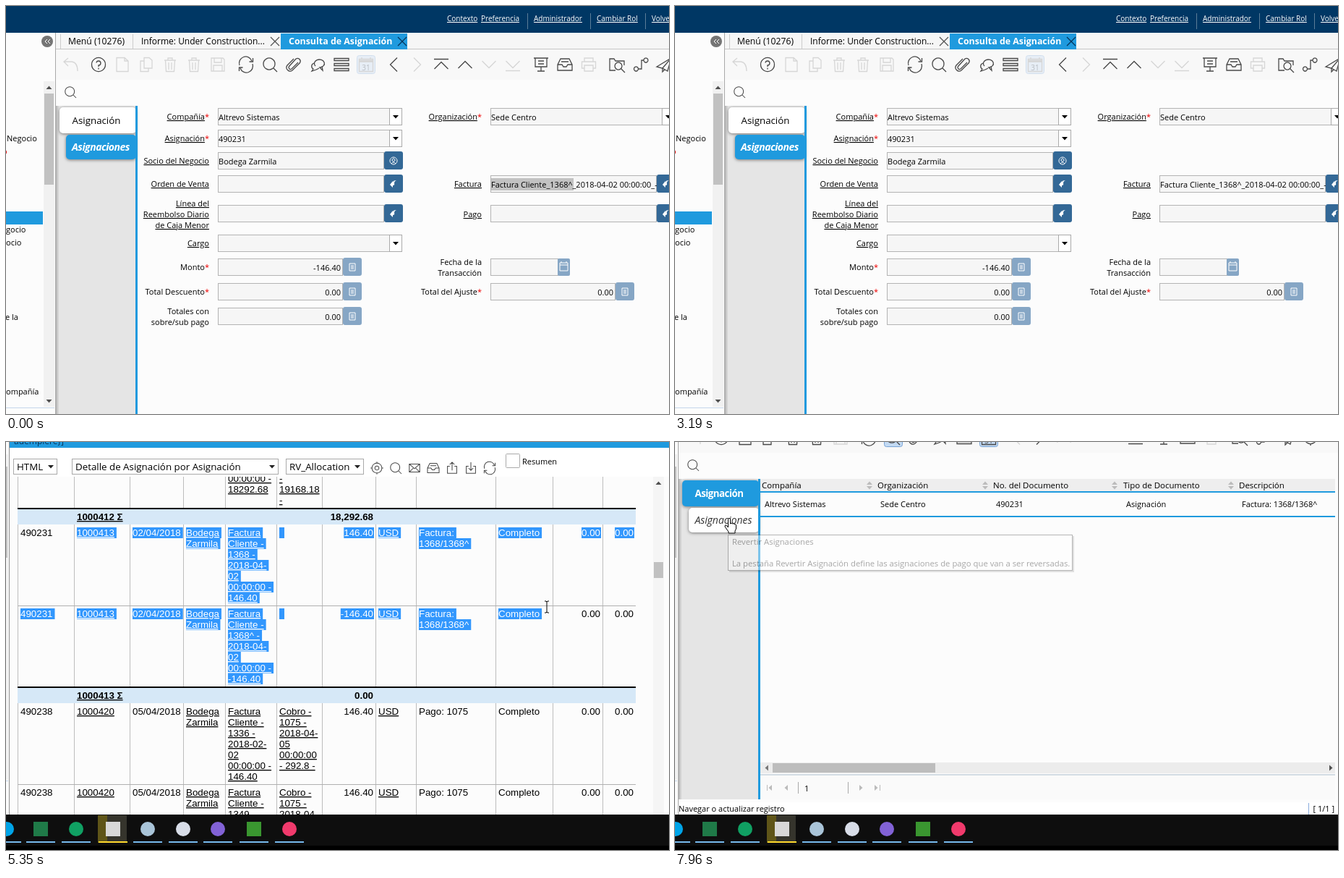
Animation of 917x564 px, one loop 7990 ms. Source, as an HTML page:

```html
<!DOCTYPE html>
<html lang="es">
<head>
<meta charset="utf-8">
<style>
html, body { margin: 0; width: 100%; height: 100%; overflow: hidden; background: #fff }
svg { display: block; font: 11px "Open Sans", sans-serif }
.icon { fill: none; stroke: #484848; stroke-width: 1.3 }
.off, .form .noform, .grid .nogrid, .rec2 .nolast { stroke: #d6d6d6 }
.grid .formOnly, .form .gridOnly, .rec1 .r2, .rec2 .r1 { display: none }
.form .toggle { opacity: .3 }
.tab rect { fill: #fff; filter: drop-shadow(0 1px 2px #777) }
.tab text { font-size: 13.3px; text-anchor: middle }
.tab.two text { font-size: 14px; font-style: italic; fill: #333 }
.grid .one rect, .form .two rect { fill: #1f9ade }
.grid .tab.one text, .form .tab.two text { fill: #fff; font-weight: bold; letter-spacing: -.5px }
#table { font: 13.33px "Liberation Sans", Arial, sans-serif }
.mark { fill: none }
.sel .mark { fill: #3297fd }
.sel text { fill: #fff }
.hover text { fill: #f00 }
.old .mark { fill: #c4c4c4 }
</style>
</head>
<body>
<svg id="stage" width="917" height="564" viewBox="0 0 917 564"></svg>
<script>
const LOOP = 7990, BLUE = '#1f9ade';
const COMPANY = 'Altrevo Sistemas', ORG = 'Sede Centro', PARTNER = 'Bodega|Zarmila';

const rect = (x, y, w, h, fill, more = '') =>
  `<rect x="${x}" y="${y}" width="${w}" height="${h}" fill="${fill}" ${more}/>`;
const text = (x, y, s, more = '') => `<text x="${x}" y="${y}" ${more}>${s}</text>`;
const path = (d, more = '') => `<path d="${d}" ${more}/>`;
const at = (x, y, body) => `<g transform="translate(${x} ${y})">${body}</g>`;
const disc = (x, y, r, fill) => `<circle cx="${x}" cy="${y}" r="${r}" fill="${fill}"/>`;
const triangle = (x, y, turn, fill = '#505050') =>
  path('M-4-2H4L0 2.5Z', `transform="translate(${x} ${y}) rotate(${turn})" fill="${fill}"`);
const end = 'text-anchor="end"', under = 'text-decoration="underline"';

const ring = (x, y, r) => `M${x + r} ${y}A${r} ${r} 0 1 1 ${x + r} ${y - .01}`;
const ICONS = {
  undo: 'M-4-9L-10-4L-4 2M-10-4H1Q9-3 9 9',
  help: ring(0, 0, 9.5) + 'M-3-2.5A3 3 0 1 1 0 1V3M0 4.5V6.5',
  add: 'M-8-9.5H3L8-5V9.5H-8ZM3-9.5V-5H8',
  copy: 'M-3-9.5H4L8-6V5H-3ZM-3-5H-8V9.5H3V5',
  trash: 'M-8-6H8M-3-6V-9H3V-6M-6.5-6L-5.5 9.5H5.5L6.5-6M-2-3V7M2-3V7',
  save: 'M-9-9H7L9-7V9H-9ZM-5-9V-3H5V-9M-6 9V1H6V9',
  refresh: 'M-9 1A9 9 0 0 1 8-5M9.5-9V-4H4.5M9-1A9 9 0 0 1-8 5M-9.5 9V4H-4.5',
  search: ring(-1, -1, 8) + 'M5 5L10 10',
  clip: 'M6-3L-3 6A2.5 2.5 0 0 1-6.5 2.5L3-8A4 4 0 0 1 8.5-2.5L-2 8A5 5 0 0 1-9 1L0-8',
  chat: 'M-3 2A7 5.5 0 1 1 3 4L7 8L6 2M-5-2A5 4.5 0 0 0-6 6L-8 9L-2 7L2 5',
  list: 'M-10-8.500H10V-5.500H-10ZM-10-1.500H10V1.500H-10ZM-10 5.500H10V8.500H-10Z',
  calendar: 'M-9.500-7.500H9.500V9.500H-9.500ZM-9.500-4H9.500M-9.500-5.500H9.500M-6-10V-7M6-10V-7',
  left: 'M5-9.500L-4.500 0L5 9.500', right: 'M-5-9.500L4.500 0L-5 9.500',
  first: 'M-10-7.500H10M-9.500 6L0-3.500L9.500 6', up: 'M-9.500 5L0-4.500L9.500 5',
  down: 'M-9.500-5L0 4.500L9.500-5', last: 'M-9.500-5L0 4.500L9.500-5M-10 8.500H10',
  board: 'M-10-9H10M-8-9V3H8V-9M0 3V9M-5 9H5M-4-5H4M-4-1H4',
  inbox: 'M-10 0L-6-8H6L10 0V8H-10ZM-10 0H-4L-2 3H2L4 0H10M-5-4H5',
  print: 'M-6-4V-9H6V-4M-6 5H-9.500V-4H9.500V5H6M-6 1H6V9H-6Z',
  folder: 'M-2 8H-10V-8H-4L-2-5H10V1' + ring(2, 2, 5) + 'M6 6L11 11',
  flow: ring(-6.5, 6, 3) + ring(7, -6, 3) + 'M-3.500 6H1V-6H4',
  send: 'M-10 3L10-9L5 9L-2 5ZM-2 5L10-9M-2 5V10L1 7',
  gear: ring(0, 0, 8.5) + ring(0, 0, 3.5) + 'M0-8V-11M0 8V11M-8 0H-11M8 0H11',
  mail: 'M-9-7H9V7H-9ZM-9-7L0 1L9-7M-9 7L-2 0M9 7L2 0',
  upload: 'M-4-3H-8V9H8V-3H4M0 4V-10M-4-6L0-10L4-6',
  download: 'M-4-3H-8V9H8V-3H4M0-10V4M-4 0L0 4L4 0'
};
const icon = (name, x, y, cls = '', scale = 1) =>
  path(ICONS[name], `class="icon ${cls}" transform="translate(${x} ${y}) scale(${scale})"`);

// ---- application window ----
const toolbar = [
  ['undo', 90, 'off'], ['help', 128], ['add', 161, 'noform'], ['copy', 194, 'noform'],
  ['trash', 227, 'noform'], ['trash', 260, 'noform'], ['save', 293, 'off'], ['refresh', 332],
  ['search', 365], ['clip', 398], ['chat', 431], ['list', 464], ['calendar', 498, 'noform'],
  ['left', 536, 'nogrid'], ['right', 569, 'noform'], ['first', 602], ['up', 635],
  ['down', 668, 'nolast'], ['last', 701, 'nolast'], ['board', 740], ['inbox', 773],
  ['print', 806, 'off'], ['folder', 845], ['flow', 878], ['send', 910], ['gear', 943]
];
const pressed = (x, cls) => rect(x - 12.5, 68.5, 25, 25, '#c3daf3', `rx="3" stroke="#79a4d6" class="${cls}"`);
const cross = (x, color) => path(`M${x - 6} 43l12 12m0-12l-12 12`, `stroke="${color}" stroke-width="1.3"`);

function chrome() {
  const links = [[610, 'Contexto'], [657, 'Preferencia'], [730, 'Administrador'], [817, 'Cambiar Rol'], [893, 'Volver']];
  const tree = [[1, 187, 'Negocio'], [-5, 205, 'o', 'fill="#d00"'], [0, 313, 'gocio'], [0, 331, 'ocio'],
    [-1, 434, 'e la'], [0, 537, 'ompañía']];
  return rect(0, 0, 990, 640, '#fcfcfc') + rect(0, 0, 990, 37, '#003764')
    + links.map(([x, s]) => text(x, 21, s, `fill="#fff" font-size="10" ${under}`)).join('')
    + [721, 808, 884].map(x => rect(x, 10, 1, 22, '#5c7d98')).join('')
    + disc(57, 49, 8, '#757575') + path('M57 46l-3 3l3 3m4-6l-3 3l3 3', 'fill="none" stroke="#fff"')
    + rect(0, 284, 51, 18, BLUE) + tree.map(a => text(...a)).join('')
    + rect(52, 104, 15, 450, '#f1f1f1') + rect(53, 121, 13, 126, '#c1c1c1')
    + triangle(59.5, 113, 180) + triangle(59.5, 546, 0) + rect(0, 555, 67, 1, '#c4d6ea')
    + rect(69, 37, 921, 22, '#f6f6f6') + rect(69, 59, 921, 1, '#c6c6c6')
    + rect(75, 39, 1, 20, '#ccc') + rect(175, 39, 1, 20, '#ccc') + rect(380, 38, 175, 22, BLUE)
    + text(86, 53, 'Menú (10276)', 'font-size="12.2"')
    + text(187, 53, 'Informe: Under Construction...', 'font-size="12"') + cross(372, '#555')
    + text(391, 53, 'Consulta de Asignación', 'font-size="12.4" font-weight="bold" fill="#fff"') + cross(548, '#04355c')
    + rect(69, 60, 921, 42, '#f8f8f8') + pressed(366, 'gridOnly') + pressed(498, 'toggle')
    + toolbar.map(([n, x, c]) => icon(n, x, 81, c)).join('')
    + text(498, 89, '31', 'font-size="10" text-anchor="middle" fill="#484848" class="toggle"')
    + icon('search', 89, 119, '', .8)
    + rect(68, 37, 1, 565, '#a8a8a8') + rect(69, 138, 110, 443, '#e5e5e5')
    + rect(69, 138, 2, 443, '#bbb') + rect(71, 138, 2, 443, '#d4d4d4')
    + `<g class="tab one">${rect(74, 140, 106, 36, '', 'rx="5"')}${text(125, 163, 'Asignación')}</g>`
    + `<g class="tab two">${rect(83, 178, 97, 34, '', 'rx="5"')}${text(131, 200, 'Asignaciones')}</g>`
    + rect(179, 138, 3, 443, BLUE)
    + rect(69, 585, 921, 17, '#fff') + text(69, 598, 'Navegar o actualizar registro')
    + rect(940, 586, 1, 16, '#88aadd') + text(976, 598, '[ 1/1 ]', end);
}

function grid() {
  const cols = [[184, 'Compañía', COMPANY], [344, 'Organización', ORG], [504, 'No. del Documento', '490231'],
    [684, 'Tipo de Documento', 'Asignación'], [844, 'Descripción', 'Factura: 1368/1368^']];
  return rect(182, 138, 795, 17, '#eee')
    + cols.map(([x, head, value]) => text(x, 151, head, 'font-size="11.5"') + text(x + 4, 177, value)).join('')
    + [333, 493, 672, 833].map(x => triangle(x, 144, 180, '#bbb') + triangle(x, 150, 0, '#bbb')).join('')
    + rect(182, 155, 795, 2, BLUE) + rect(182, 189, 795, 2, BLUE)
    + rect(182, 530, 795, 15, '#ececec') + rect(199, 531, 225, 13, '#bdbdbd')
    + triangle(191, 537.5, 90, '#777') + triangle(971, 537.5, 270)
    + rect(182, 546, 795, 2, '#d3dce3') + rect(182, 548, 795, 33, '#fafafa')
    + [234, 303].map(x => rect(x, 557, 1, 16, '#aaa')).join('') + text(243, 570, '1')
    + [[196, 90], [218, 90], [321, 270], [342, 270]].map(([x, r]) => triangle(x, 565, r, '#bbb')).join('')
    + rect(191, 561, 1, 8, '#bbb') + rect(347, 561, 1, 8, '#bbb');
}

const box = (x, y, w) => rect(x + .5, y - 11.5, w - 1, 23, '#f6f6f6', 'stroke="#b4b4b4"');
const combo = (x, y, w, s) => box(x, y, w) + rect(x + w - 17.5, y - 11.5, 17, 23, '#fff', 'stroke="#aaa"')
  + triangle(x + w - 9, y, 0, '#000') + text(x + 1, y + 5, s);
const button = (x, y, fill, glyph) => rect(x, y - 13, 26, 25, fill, 'rx="3"') + at(x + 13, y, glyph);
const outline = d => path(d, 'fill="none" stroke="#fff"');
const returnArrow = path('M4-5Q-1-5-1-2V-4L-5 1L-1 5V2Q2 2 1-1Q1-4 4-5', 'fill="#fff"');
const person = outline(ring(0, 0, 5) + ring(0, -1, 2) + 'M-3 4Q0 0 3 4');
const calculator = outline('M-4-5H4V5H-4ZM-2-2H2M-2 0H2M-2 2H2');
const lookup = (x, y, content = '', glyph = returnArrow) =>
  box(x, y, 230) + content + button(x + 230, y, '#336896', glyph);
const number = (x, y, s) => box(x, y, 173) + text(x + 170, y + 5, s, end)
  + button(x + 173, y, '#86a6c5', calculator);
const label = (x, y, s, star, u = under) =>
  text(x, y + 4, `<tspan ${u}>${s}</tspan>${star ? '<tspan fill="#e00">*</tspan>' : ''}`, end);

function form() {
  const invoice = (cls, no, total) => text(671, 251, `Factura Cliente_${no}_2018-04-02 00:00:00_${total}`, `class="${cls}"`);
  return label(281, 153, 'Compañía', 1) + combo(293, 153, 255, COMPANY)
    + label(658, 153, 'Organización', 1) + combo(670, 153, 255, ORG)
    + label(281, 183, 'Asignación', 1) + combo(293, 183, 255, '490231')
    + label(281, 214, 'Socio del Negocio') + lookup(293, 214, text(294, 219, PARTNER.replace('|', ' ')), person)
    + label(281, 246, 'Orden de Venta') + lookup(293, 246)
    + label(658, 246, 'Factura')
    + lookup(670, 246, rect(671, 238, 114, 17, '#c2c2c2', 'id="picked"') + invoice('r1', '1368', '146.40') + invoice('r2', '1368^', '-146.40'))
    + ['Línea del', 'Reembolso Diario', 'de Caja Menor'].map((s, i) => label(281, 273 + 15 * i, s)).join('')
    + lookup(293, 287) + label(658, 288, 'Pago') + lookup(670, 287)
    + label(281, 328, 'Cargo') + combo(293, 328, 255, '')
    + label(281, 361, 'Monto', 1, '') + `<g class="r1">${number(293, 361, '146.40')}</g><g class="r2">${number(293, 361, '-146.40')}</g>`
    + label(658, 354, 'Fecha de la', 0, '') + label(658, 369, 'Transacción', 0, '')
    + box(670, 361, 94) + rect(763, 349, 17, 24, '#86a6c5', 'rx="2"')
    + outline('M766 355h11v11h-11zM766 358h11M768 353v2M775 353v2')
    + label(281, 395, 'Total Descuento', 1, '') + number(293, 395, '0.00')
    + label(658, 395, 'Total del Ajuste', 1, '') + number(670, 395, '0.00')
    + label(281, 422, 'Totales con', 0, '') + label(281, 437, 'sobre/sub pago', 0, '') + number(293, 429, '0.00');
}

// ---- report window ----
const EDGES = [16, 94, 171, 245, 303, 374, 437, 511, 567, 677, 756, 825];
const TEXT_X = [20, 98, 175, 249, 307, 378, 508, 515, 571, 681, 822, 868];
const LINKED = [1, 3, 4, 5, 7], RIGHT = [6, 10, 11];

const cell = (col, top, s, row) => s.split('|').map((line, i) =>
  `<g class="cell" data-index="${row * 12 + col}">${rect(TEXT_X[col], top + 4 + 15 * i, 0, 15, '', 'class="mark"')}`
  + text(TEXT_X[col], top + 16 + 15 * i, line, (LINKED.includes(col) ? under : '') + (RIGHT.includes(col) ? end : '')) + '</g>').join('');
const record = (row, top, id, ref, date, invoice, payment, amount, note) =>
  [id, ref, date, PARTNER, invoice, payment, amount, 'USD', note, 'Completo', '0.00', '0.00']
    .map((s, col) => cell(col, top, s, row)).join('') + rect(16, top + 112, 855, 1, '#b0b0b0');
const summary = (top, ref, total) => rect(16, top, 855, 22, '#d6e8f7')
  + text(98, top + 16, ref + ' Σ', 'font-weight="bold" ' + under) + text(508, top + 16, total, 'font-weight="bold" ' + end);
const select = (x, w, s) => rect(x + .5, 23.5, w - 1, 21, '#fff', 'stroke="#a9a9a9"')
  + text(x + 5, 39, s, 'font-size="13.33"') + triangle(x + w - 9, 34, 0, '#222');

function report() {
  const table = cell(4, 39, '00:00:00 -|18292.68', 9) + cell(5, 39, '-|19168.18|-', 9)
    + summary(92, '1000412', '18,292.68')
    + record(0, 114, '490231', '1000413', '02/04/2018', 'Factura|Cliente -|1368 -|2018-04-|02|00:00:00 -|146.40', '', '146.40', 'Factura:|1368/1368^')
    + record(1, 226, '490231', '1000413', '02/04/2018', 'Factura|Cliente -|1368^ -|2018-04-|02|00:00:00 -|-146.40', '', '-146.40', 'Factura:|1368/1368^')
    + summary(339, '1000413', '0.00')
    + record(2, 361, '490238', '1000420', '05/04/2018', 'Factura|Cliente -|1336 -|2018-02-|02|00:00:00 -|146.40', 'Cobro -|1075 -|2018-04-|05|00:00:00|- 292.8 -', '146.40', 'Pago: 1075')
    + record(3, 473, '490238', '1000420', '05/04/2018', 'Factura|Cliente -|1349', 'Cobro -|1075 -|2018-04', '146.40', 'Pago: 1075');
  return rect(4, 0, 913, 515, '#fcfcfc') + rect(4, 0, 1, 515, '#909090')
    + EDGES.map(x => rect(x, 48, 1, 467, '#bdbdbd')).join('') + `<g id="table">${table}</g>`
    + [91, 338].map(y => rect(16, y, 855, 2, '#000')).join('')
    + rect(5, 0, 912, 48, '#fff') + rect(5, 0, 912, 8, BLUE) + text(11, 3, 'adempiere}]', 'font-size="12" fill="#04355c"')
    + select(10, 61, 'HTML') + select(91, 286, 'Detalle de Asignación por Asignación') + select(387, 108, 'RV_Allocation')
    + ['gear', 'search', 'mail', 'inbox', 'upload', 'download', 'refresh'].map((n, i) => icon(n, 513 + 26 * i, 36, '', .8)).join('')
    + rect(691.5, 16.5, 19, 19, '#fff', 'stroke="#aaa" rx="1"') + text(714, 31, 'Resumen')
    + rect(895, 48, 15, 467, '#f5f5f5') + rect(896, 166, 13, 22, '#c1c1c1') + triangle(902.5, 57, 180);
}

function taskbar() {
  const marks = [[1, '#00a4e8'], [48, '#1f7a48', 1], [97, '#10a063'], [148, '#d8d8d8', 1], [196, '#a9c4d8'],
    [245, '#d8dde8'], [293, '#8262d6'], [343, '#3a9630', 1], [392, '#f03a6c']];
  return rect(0, 515, 917, 49, '#0e0e0e') + rect(0, 558, 917, 6, '#000')
    + rect(127, 516, 13, 38, '#5f5518') + rect(140, 516, 27, 38, '#35342c')
    + rect(368, 515, 48, 40, '#3d3238', 'id="active"')
    + marks.map(([x, fill, square], i) => rect(x - 20, 552, 40, 2, i === 3 ? '#ffd92e' : '#76b9ed')
      + (square ? rect(x - 10, 525, 20, 20, fill) : disc(x, 535, 10, fill))).join('');
}

const tooltip = rect(75, 130, 477, 50, '#0004') + rect(73.5, 128.5, 476, 49, '#fff', 'stroke="#555"')
  + [[142, 'Revertir Asignaciones'], [172, 'La pestaña Revertir Asignación define las asignaciones de pago que van a ser reversadas.']]
    .map(([y, s]) => text(79, y, s, 'font-size="11.3" fill="#333"')).join('');

const stage = document.getElementById('stage');
stage.innerHTML = `<g id="app">${chrome()}<g class="gridOnly">${grid()}</g><g class="formOnly">${form()}</g></g>
  <g id="report">${report()}</g><g id="tip">${tooltip}</g><path id="cursor" stroke="#000"/><g id="bar">${taskbar()}</g>`;
const byId = Object.fromEntries([...stage.querySelectorAll('[id]')].map(e => [e.id, e]));
const show = (id, on) => { byId[id].style.display = on ? '' : 'none'; };

// fit each highlight to its line of text
const cells = [...stage.querySelectorAll('.cell')];
for (const c of cells) {
  const [mark, label] = c.children, width = label.getComputedTextLength();
  const right = RIGHT.includes(c.dataset.index % 12);
  if (right) mark.setAttribute('x', mark.getAttribute('x') - width);
  mark.setAttribute('width', right ? width + 1 : Math.max(7, width + 3));
}

// ---- motion ----
const CURSORS = {
  arrow: 'M.5.5V16L4 12.500L6.500 18L9 17L6.500 11.500H11Z',
  hand: 'M-1.500 1.500Q0-1 1.500 1.500V8Q3 6 4.500 8Q6 7 7 8.500Q9 8 9.500 10V15L8 18V21H-1V19L-6 12Q-6 9-4 10L-1.500 13Z',
  beam: 'M-3-8H-1L0-7L1-8H3M0-7V7M-3 8H-1L0 7L1 8H3'
};
const TRACK = [
  [100, 785, 250], [560, 141, 160], [820, 141, 160], [1090, 460, 218], [1240, 460, 218], [1560, 154, 199],
  [1780, 154, 199], [2140, 636, 488], [2350, 636, 488], [2800, 668, 82], [3130, 668, 82], [3160, 795, 128],
  [4450, 781, 46], [4690, 781, 46], [4930, 82, 122], [4990, 82, 122], [5440, 824, 240], [5920, 824, 240],
  [6250, 187, 122], [6580, -12, 500], [7360, 24, 512], [7600, 75, 105], [LOOP, 75, 105]
];
function pointer(t) {
  const i = Math.max(1, TRACK.findIndex(k => k[0] > t));
  const [t0, x0, y0] = TRACK[i - 1], [t1, x1, y1] = TRACK[i];
  const p = Math.max(0, (t - t0) / (t1 - t0)), e = p * p * (3 - 2 * p);
  return [x0 + (x1 - x0) * e, y0 + (y1 - y0) * e];
}

function draw() {
  const t = performance.now() % LOOP;
  const moved = t >= 3580, reporting = moved && t < 6790, dragged = t >= 4990;
  const gridView = t >= 590 && t < 1620 || t >= 6790;
  byId.app.setAttribute('class', gridView ? 'grid' : 'form ' + (t >= 1620 && t < 2950 ? 'rec1' : 'rec2'));
  byId.app.setAttribute('transform', moved ? 'translate(-64 -87)' : '');
  show('report', reporting);
  show('bar', moved);
  show('active', !dragged);
  show('picked', t < 590);
  byId.tip.style.opacity = t < 7780 ? 0 : t < 7960 ? .2 : .42;

  // everything between the drag start and the pointer is selected
  const [dragX, dragY] = pointer(Math.min(t, 5440));
  const reach = dragged ? (dragY >= 226 ? 12 : 0) + EDGES.filter(x => x < dragX).length : 0;
  for (const c of cells) {
    const i = +c.dataset.index;
    const state = i >= 1 && i < reach ? 'sel' : i === 6 && !dragged ? 'old' : i === 1 && t >= 4870 && !dragged ? 'hover' : '';
    c.setAttribute('class', 'cell ' + state);
  }

  const [x, y] = pointer(t), dx = moved ? 64 : 0, dy = moved ? 87 : 0;
  const overTab = x + dx > 74 && x + dx < 180 && y + dy > 140 && y + dy < 212;
  const kind = reporting ? (dragged && t < 6500 ? 'beam' : 'arrow') : overTab || !moved && y < 95 ? 'hand' : 'arrow';
  show('cursor', t >= 100 && t < 3190 || t >= 4450 && t < 6580 || t >= 7360);
  byId.cursor.setAttribute('d', CURSORS[kind]);
  byId.cursor.setAttribute('fill', kind === 'beam' ? 'none' : '#fff');
  byId.cursor.setAttribute('transform', `translate(${Math.round(x)} ${Math.round(y)})`);
  requestAnimationFrame(draw);
}
draw();
</script>
</body>
</html>
```
